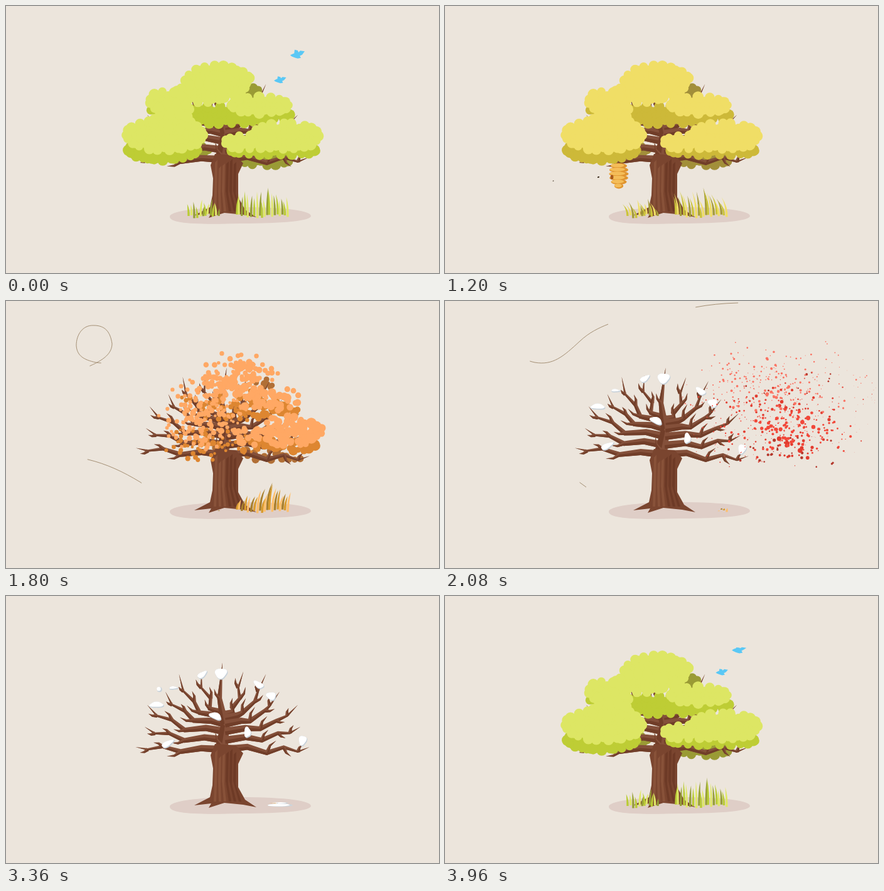
These frames come from a looping animation (690 px wide and 426 px high, 4000 ms). An HTML page with a canvas:

```html
<!DOCTYPE html>
<html lang="en">
<head>
<meta charset="utf-8">
<title>Tree through the seasons</title>
<style>
html, body { margin: 0; width: 100%; height: 100%; overflow: hidden; background: #ece5dc; }
canvas { display: block; width: 690px; height: 426px; }
</style>
</head>
<body>
<canvas id="stage"></canvas>
<script>
const LOOP = 4000, REGROW = 3300;
const canvas = document.getElementById('stage');
const ctx = canvas.getContext('2d');
const dpr = window.devicePixelRatio || 1;
canvas.width = 690 * dpr;
canvas.height = 426 * dpr;

let seed = 11;
const rand = (a = 0, b = 1) => a + (b - a) * (seed = (seed * 16807) % 2147483647) / 2147483647;
const clamp = v => Math.max(0, Math.min(1, v));
const part = (t, a, b) => clamp((t - a) / (b - a));
const smooth = p => p * p * (3 - 2 * p);
const ease = (t, a, b) => smooth(part(t, a, b));
const mix = (a, b, p) => a + (b - a) * p;
const range = n => [...Array(n).keys()];

// Eased value at t from a flat list of time, value pairs
function keys(t, ...k) {
  let i = 0;
  while (i < k.length - 2 && t >= k[i + 2]) i += 2;
  if (i >= k.length - 2 || t < k[0]) return k[i + 1];
  return mix(k[i + 1], k[i + 3], ease(t, k[i], k[i + 2]));
}

// Palettes run from spring green over yellow and orange to red
const palette = list => list.split(' ').map(h => [0, 2, 4].map(i => parseInt(h.substr(i, 2), 16)));
const shade = (pal, s) => {
  const i = Math.min(2, Math.floor(s));
  return 'rgb(' + pal[i].map((v, c) => Math.round(mix(v, pal[i + 1][c], s - i))) + ')';
};
const colors = {
  top: palette('dde664 f0de66 ffa864 fa7363'),
  low: palette('dde664 f0de66 ffa864 f2483a'),
  mid: palette('becd35 cdb939 dd8631 e23c2f'),
  back: palette('9a9b35 a28f3a b16f36 b4382c')
};
const grassColors = ['b9cc35 cbc43a d99c2e d99c2e', 'dfe868 f0df66 ffbf6a ffbf6a', '969f38 a49c3a a8802f a8802f'].map(palette);

function poly(pts) {
  const p = new Path2D();
  pts.forEach(([x, y]) => p.lineTo(x, y));
  p.closePath();
  return p;
}
function fill(path, color) {
  ctx.fillStyle = color;
  ctx.fill(path);
}
function oval(x, y, rx, ry, color, turn = 0) {
  ctx.fillStyle = color;
  ctx.beginPath();
  ctx.ellipse(x, y, rx, ry, turn, 0, 7);
  ctx.fill();
}
const disc = (x, y, r, color) => oval(x, y, r, r, color);
function at(x, y, sx, sy, paint) {
  ctx.save();
  ctx.translate(x, y);
  ctx.scale(sx, sy);
  paint();
  ctx.restore();
}

// Branches: a fan of kinked, tapering limbs whose tips lie on an ellipse
const limbs = [];
function addLimb(pts, w) {
  const n = pts.length - 1, a = [], b = [];
  pts.forEach(([x, y], i) => {
    const [px, py] = pts[Math.max(0, i - 1)], [qx, qy] = pts[Math.min(n, i + 1)];
    const d = Math.hypot(qx - px, qy - py), h = (w * (1 - i / n) + 1.2 * (i < n)) / 2;
    const nx = (py - qy) / d * h, ny = (qx - px) / d * h;
    a.push([x + nx, y + ny]);
    b.push([x - nx, y - ny]);
  });
  const under = pts[n][0] > pts[0][0] ? a : b;
  limbs.push({ body: poly([...a, ...b.slice().reverse()]), dark: poly([...under, ...pts.slice().reverse()]) });
}
for (const i of range(13)) {
  const turn = Math.PI * i / 12, reach = i % 2 ? .92 : .99, middle = i === 6;
  const tx = 345 - 140 * reach * Math.cos(turn), ty = 241 - 136 * reach * Math.sin(turn);
  const rx = 349, ry = middle ? 264 : 245 - 58 * Math.sin(turn), cx = mix(rx, tx, .7);
  const pts = range(6).map(k => {
    const s = k / 5, kink = k % 5 ? (k % 2 ? 1 : -1) * rand(2, 6) : 0;
    const x = mix(mix(rx, cx, s), mix(cx, tx, s), s), y = mix(ry, ty, s * s);
    return [x + kink * Math.sin(turn), y - kink * Math.abs(Math.cos(turn))];
  });
  addLimb(pts, middle ? 32 : 11);
  for (const k of [2, 3, 4]) {
    const [x, y] = pts[k], [qx, qy] = pts[k + 1];
    const dir = Math.atan2(qy - y, qx - x) + (k % 2 ? .85 : -.85), len = rand(20, 27) - k * 3;
    const bend = dir - (k % 2 ? .5 : -.5);
    const ex = x + Math.cos(dir) * len * .6, ey = y + Math.sin(dir) * len * .6;
    addLimb([[x, y], [ex, ey], [ex + Math.cos(bend) * len * .6, ey + Math.sin(bend) * len * .6]], 5);
  }
}

const shadow = new Path2D('M261 336C261 328 300 321 374 321S486 327 486 335S440 347 374 347C300 349 261 347 261 336Z');
const trunk = new Path2D('M333 236L326 254 330 275 329 302 325 321 300 334 327 331 323 338 348 330 378 333 399 337 381 325 370 305V268L378 251 366 238Z');
const streaks = range(6).map(i => {
  const x = 333 + i * 6, foot = 331 + i * 8, top = rand(242, 262);
  return [i < 3 ? '#885239' : '#6d3a26', poly([[x, top], [x + 4, top - 4], [x + 3, 300], [foot + 4, 328], [foot, 328], [x - 1, 295]])];
});

// Leaf clouds: each ellipse becomes a jittered grid of discs with a bumpy rim
function leaves(color, ...ovals) {
  const dots = [];
  const add = (x, y, r) => dots.push({
    x, y, r, color,
    start: 1470 + (x - 185) * .95 + rand(-70, 70),
    push: rand(500, 1250),
    rise: rand(-75, 45),
    grow: 3430 + Math.hypot(x - 345, y - 230) * 1.15 + rand(0, 70)
  });
  for (const [cx, cy, rx, ry] of ovals) {
    for (let x = -rx; x <= rx; x += 7.5)
      for (let y = -ry; y <= ry; y += 7.5)
        if (Math.hypot(x / rx, y / ry) < 1) add(cx + x + rand(-1, 1), cy + y + rand(-1, 1), 6.8);
    const n = Math.round(Math.PI * Math.hypot(rx, ry) * 1.41 / 13);
    for (const i of range(n)) {
      const a = (i + rand(-.2, .2)) / n * Math.PI * 2;
      add(cx + rx * Math.cos(a), cy + ry * Math.sin(a), rand(6.5, 9));
    }
  }
  return dots;
}
const backDots = leaves('back', [385, 135, 17, 5], [413, 247, 36, 7], [312, 230, 10, 5]);
const frontDots = [
  leaves('mid', [350, 174, 75, 14], [242, 166, 11, 6], [432, 173, 20, 7]),
  leaves('top', [335, 122, 49, 27], [372, 114, 16, 9], [312, 139, 40, 15], [256, 152, 27, 16], [268, 166, 24, 12], [405, 158, 45, 13]),
  leaves('mid', [250, 230, 55, 16]),
  leaves('low', [253, 206, 61, 24], [265, 184, 30, 12]),
  leaves('mid', [426, 231, 68, 7]),
  leaves('low', [445, 208, 53, 21], [387, 217, 38, 11])
].flat();

function drawDots(dots, t, tint) {
  for (const d of dots) {
    let { x, y, r } = d;
    if (t > REGROW) r *= ease(t, d.grow, d.grow + 170);
    else {
      const age = Math.max(0, t - d.start) / 1000;
      x += d.push * age * age;
      y += d.rise * age;
      r *= Math.pow(clamp(1 - age / .75), 1.9);
    }
    if (r > .15) disc(x, y, r, tint[d.color]);
  }
}

// Grass: two tufts of random blades, tallest towards the trunk
const blades = [[291, 340, 24], [368, 450, 40]].flatMap(([from, to, tall]) => {
  const list = [];
  for (let x = from; x <= to; x += rand(3, 5.5)) {
    const p = part(x, from, to);
    list.push({ x, base: rand(332, 339), tall: mix(14, tall, Math.sqrt(Math.sin(Math.PI * mix(.15, .92, p)))) * rand(.6, 1.15), tilt: rand(-3, 3) });
  }
  return list;
});
function drawGrass(t, season) {
  const lean = keys(t, 0, 0, 300, 3, 650, -2, 900, 2, 1200, -6, 1480, 4, 1800, 7, 2100, 8, 3400, 0, 3700, -2, 4000, 0);
  blades.forEach(({ x, base, tall, tilt }, i) => {
    const edge = 1610 + (x - 290) * 2.8;
    const k = t > REGROW ? ease(t, 3450 + i * 5, 3700 + i * 5) : 1 - part(t, edge - 150, edge + 70);
    if (!k) return;
    const tx = x + (tilt + lean) * k, ty = base - tall * k;
    ctx.fillStyle = shade(grassColors[i % 3], season);
    ctx.beginPath();
    ctx.moveTo(x - 1.7, base);
    ctx.quadraticCurveTo(x - 1.7, mix(base, ty, .6), tx, ty);
    ctx.quadraticCurveTo(x + 2.2, mix(base, ty, .5), x + 1.7, base);
    ctx.fill();
  });
}

// Snow caps: x, y, half width, half height, turn
const snow = [[240, 174, 21, 9, 0], [267, 147, 13, 5, 0], [313, 126, 16, 9, -.6], [343, 124, 18, 16, 0], [403, 142, 17, 9, .6],
  [423, 160, 15, 12, .4], [334, 192, 19, 10, .4], [385, 218, 10, 16, -.1], [258, 236, 20, 9, -.5], [473, 231, 12, 15, .1]]
  .map(([x, y, rx, ry, turn], n) => {
    const shape = poly(range(24).map(i => {
      const a = i / 24 * Math.PI * 2, k = 1 + .12 * Math.sin(a * 3 + n);
      const u = rx * k * Math.cos(a), v = ry * k * Math.sin(a);
      return [u * Math.cos(turn) - v * Math.sin(turn), u * Math.sin(turn) + v * Math.cos(turn)];
    }));
    return { x, y, shape };
  });
function drawSnow(t) {
  const s = keys(t, 1960, 0, 2080, .55, 2400, 1, 2850, 1, 3360, .55, 3520, 0);
  for (const { x, y, shape } of snow) at(x, y, s, s, () => {
    fill(shape, '#c8d2da');
    ctx.clip(shape);
    ctx.translate(-2, -3);
    fill(shape, '#fff');
  });
}

const flakes = range(11).map(i => {
  const x = 215 + (i * 101 + 67) % 262;
  return { x, start: 2260 + i * 62, land: 241 - 110 * Math.sqrt(1 - ((x - 345) / 140) ** 2) };
});
function drawFlakes(t) {
  for (const { x, start, land } of flakes) {
    const y = (t - start) * .32 - 5;
    if (y < -5 || y > land) continue;
    disc(x + .6, y + .4, 4, '#c8d2da');
    disc(x - .5, y - .6, 3.2, '#fff');
  }
}

function ball(y, r) {
  disc(0, y, r, '#ccd5dc');
  ctx.save();
  ctx.clip();
  disc(-r * .23, y - r * .2, r * .98, '#fff');
  ctx.restore();
}
function drawSnowman(t) {
  const melt = ease(t, 2860, 3340), size = ease(t, 2070, 2400) * (1 - part(t, 3370, 3490));
  at(437, 336, size * mix(1, .86, melt), size * mix(1, .1, melt), () => {
    ball(-22, 23.3);
    ball(-54, 15);
    disc(-11, -59, 1.4, '#2e2b2a');
    disc(-5, -59, 1.4, '#2e2b2a');
    fill(poly([[-21, -50], [-9, -55], [-6, -52], [-8, -49]]), '#f7941d');
  });
}

function drawHive(t) {
  const s = keys(t, 780, 0, 980, 1.08, 1060, 1, 1400, 1, 1560, 0);
  at(277, 250, s, s, () => {
    const rows = range(6).map(i => [5 + i * 6.4, 15.5 * Math.sqrt(1 - ((i - 1.9) / 3.5) ** 2)]);
    rows.forEach(([y, w]) => oval(0, y, w, 4.4, '#e0942f'));
    rows.forEach(([y, w]) => oval(-w * .16, y - .6, w * .82, 2.9, '#f4bd59'));
    oval(-11, 23, 2.4, 3.6, '#a95a1c');
  });
}
function drawBees(t) {
  [[1143, 372, 1.7], [830, 252, 1]].forEach(([from, speed, r], i) => {
    const age = (t - from) / 1000, x = 266 - speed * age;
    if (age > 0 && x > 58) oval(x, 273 + i * 6 + Math.sin(age * 17) * 3 * i, r, r * .65, '#3a2c1c', -.3);
  });
}

// Wind lines: path, head start and end, tail start and end
const winds = [
  ['M92 117C110 112 125 108 135 103C155 94 169 84 169 68C166 48 157 39 140 39C122 38 112 54 112 71C113 88 125 94 143 98C172 103 188 89 215 64C230 50 245 43 260 37', 1440, 1990, 1735, 2300],
  ['M57 245C82 246 106 248 131 253C160 260 186 272 214 289L225 297', 1480, 1822, 1580, 2120],
  ['M399 10Q430 4 467 3Q505 3 544 14', 1950, 2230, 2080, 2680]
].map(([d, ...times]) => {
  const el = document.createElementNS('http://www.w3.org/2000/svg', 'path');
  el.setAttribute('d', d);
  return { path: new Path2D(d), size: el.getTotalLength(), times };
});
function drawWind(t) {
  ctx.strokeStyle = '#9b8568';
  ctx.lineWidth = .9;
  for (const { path, size, times: [h0, h1, t0, t1] } of winds) {
    const head = part(t, h0, h1) * size, tail = part(t, t0, t1) * size;
    if (head - tail < .5) continue;
    ctx.setLineDash([head - tail, 2000]);
    ctx.lineDashOffset = -tail;
    ctx.stroke(path);
  }
  ctx.setLineDash([]);
}

// Each bird follows one Bezier arc out of the crown and back
const birds = [
  { xs: [450, 508, 420, 385], ys: [150, 42, 58, 125], phase: 0 },
  { xs: [455, 440, 424, 385], ys: [150, 100, 112, 140], phase: .6 }
];
const birdBody = new Path2D('M-11 2Q-5 -3 2 -1L6 6 1 7Q-7 5 -11 2Z');
function drawBirds(t) {
  const s = ((t > 2000 ? t - LOOP : t) + 188) / 500, q = 1 - s;
  if (s < 0 || s > 1) return;
  const along = v => q * q * q * v[0] + 3 * q * q * s * v[1] + 3 * q * s * s * v[2] + s * s * s * v[3];
  birds.forEach(({ xs, ys, phase }, i) => at(along(xs), along(ys), 1 - i * .15, 1 - i * .15, () => {
    const flap = .4 + .75 * Math.cos(t / LOOP * Math.PI * 50 + phase);
    fill(birdBody, '#5ac8f5');
    fill(poly([[-5, 2], [-4, -6 * flap], [1, -5 * flap], [4, 2]]), '#5ac8f5');
    fill(poly([[-2, 1], [5, -4 * flap - 1], [12, -4 * flap], [8, 1], [2, 4]]), '#5ac8f5');
  }));
}

function swayed(t, paint) {
  ctx.save();
  ctx.translate(350, 250);
  ctx.rotate(keys(t, 1450, 0, 1760, .046, 2120, .046, 2420, 0));
  ctx.translate(-350, -250);
  paint();
  ctx.restore();
}

function draw(t) {
  ctx.setTransform(dpr, 0, 0, dpr, 0, 0);
  ctx.fillStyle = '#ece5dc';
  ctx.fillRect(0, 0, 690, 426);
  const season = t > REGROW ? 0 : keys(t, 650, 0, 1120, 1, 1300, 1, 1720, 2, 1830, 2, 2050, 3);
  const tint = {};
  for (const c in colors) tint[c] = shade(colors[c], season);

  fill(shadow, '#dfcec7');
  drawWind(t);
  drawBirds(t);
  drawDots(backDots, t, tint);
  swayed(t, () => limbs.forEach(({ body, dark }) => {
    fill(body, '#84503a');
    fill(dark, '#713e29');
  }));
  fill(trunk, '#7a452f');
  streaks.forEach(([c, p]) => fill(p, c));
  swayed(t, () => drawSnow(t));
  drawGrass(t, season);
  drawHive(t);
  drawDots(frontDots, t, tint);
  drawBees(t);
  drawFlakes(t);
  drawSnowman(t);
}

const begin = performance.now();
function tick() {
  draw((performance.now() - begin) % LOOP);
  requestAnimationFrame(tick);
}
tick();
</script>
</body>
</html>
```
